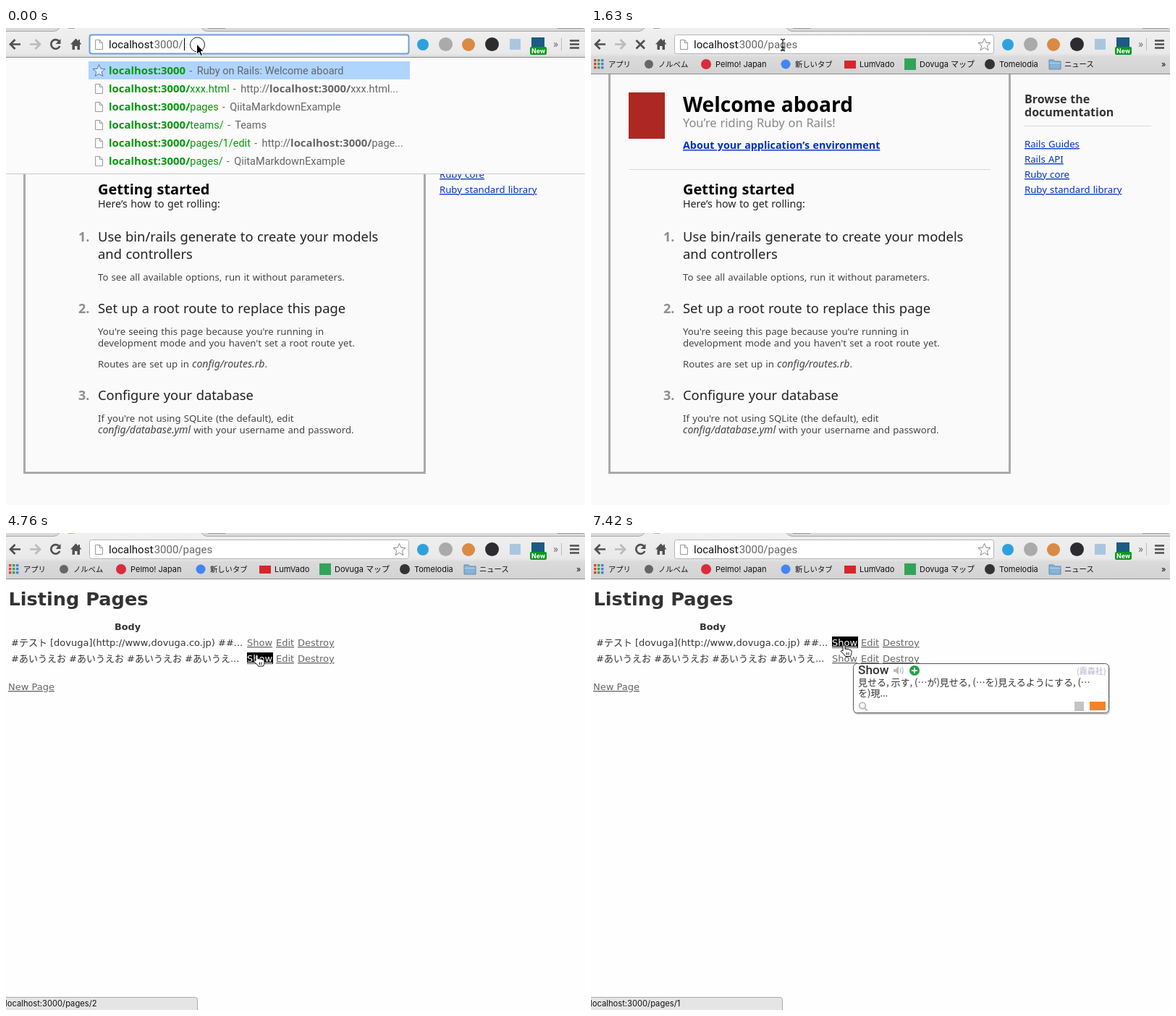
These frames come from a looping animation (800x659 px, 8000 ms). An HTML page:

```html
<!DOCTYPE html>
<html lang="ja">
<head>
<meta charset="utf-8">
<title>Browser session</title>
<style>
html, body { margin: 0; width: 100%; height: 100%; overflow: hidden; background: #fafafa; }
svg { display: block; width: 800px; height: 659px; }
text { white-space: pre; }
.ui { font: 15px Roboto, 'Noto Sans CJK JP', sans-serif; fill: #666; }
.ui .host { fill: #111; }
.row { font: 14.5px Roboto, 'Noto Sans CJK JP', 'Noto Sans CJK', sans-serif; fill: #666; }
.row .b { font: bold 14.9px 'Noto Sans', sans-serif; }
.row .g { fill: #009a0c; }
.row .k { fill: #111; font-size: 14.85px; }
.mark, .status { font: 11px Inter, 'Noto Sans CJK JP', 'Noto Sans CJK', sans-serif; fill: #111; }
.jp { font-size: 10.3px; }
.rails { font: 13.2px 'Noto Sans', sans-serif; word-spacing: .056em; fill: #444; }
.rails .h { font-size: 18.35px; fill: #222; }
.rails .n { font-size: 18px; font-weight: bold; fill: #8d8d92; }
.rails .i { font-size: 14.1px; font-style: italic; }
.rails .bold { font-weight: bold; fill: #333; }
.rails .title { fill: #000; }
.rails .a { fill: #0330c4; text-decoration: underline; }
.list { font: 13px 'DejaVu Sans', 'Noto Sans CJK JP', 'Noto Sans CJK', sans-serif; fill: #333; }
.list .a { fill: #666; text-decoration: underline; }
.list .a.on { fill: #fff; }
.popup { font: 13px 'Noto Sans CJK JP', 'Noto Sans CJK', sans-serif; fill: #333; }
.line { fill: none; stroke: #505050; stroke-width: 2.7; }
</style>
</head>
<body>
<svg viewBox="0 0 800 659">
  <defs>
    <linearGradient id="bar" x2="0" y2="1">
      <stop stop-color="#f0f0f0"/><stop offset=".55" stop-color="#e9e9e9"/>
      <stop offset=".64" stop-color="#dadada"/><stop offset="1" stop-color="#d3d3d3"/>
    </linearGradient>
    <linearGradient id="button" x2="0" y2="1"><stop stop-color="#fff"/><stop offset="1" stop-color="#e0e0e0"/></linearGradient>
    <path id="doc" d="M.5 .5h6l4 4v9h-10zM6.5 .5v4h4" fill="#fff" stroke="#999"/>
    <path id="star" d="M0-8.5 2.4-2.8 8.5-2.4 3.8 1.6 5.3 7.6 0 4.3-5.3 7.6-3.8 1.6-8.5-2.4-2.4-2.8z" fill="#fff" fill-opacity=".5"/>
    <g id="lens" fill="none"><circle r="4.3"/><path d="M3 3 7 7"/></g>
  </defs>

  <rect width="800" height="659" fill="#fafafa"/>
  <g id="rails" class="rails"></g>
  <g id="list" class="list"></g>

  <rect width="800" height="63" fill="url(#bar)"/>
  <path d="M0 63.5H800" stroke="#8a8a8a"/>
  <path d="M0 0H74Q71 4.5 66 4.5H0zM270 0Q273 4.5 278 4.5H800V0z" fill="#d9d9d9"/>
  <path d="M0 4.5H66Q71 4.5 74 0M270 0Q273 4.5 278 4.5H800" fill="none" stroke="#a8a8a8"/>
  <path d="M279 .5H303M762 .5H798" stroke="#999"/>
  <path id="favicon" d="M86 0H95" stroke="#888" stroke-width="1.5"/>

  <path class="line" d="M20 22.5H6M12.5 16 6 22.5 12.5 29"/>
  <path class="line" d="M33 22.5H47M40.5 16 47 22.5 40.5 29" style="stroke:#bbb"/>
  <g id="reload"><path class="line" d="M73.5 18.5A6.3 6.3 0 1 0 74.3 25"/><path d="M75.5 15V22H68.5z" fill="#505050"/></g>
  <path id="stop" class="line" d="M62.5 17 74 28.5M74 17 62.5 28.5"/>
  <path d="M96.5 14.5 89 22.5H91.5V30H95V25H98.5V30H102V22.5H104.5L102 19.8V16H100V17.9z" fill="#505050"/>

  <g id="marks" class="mark"></g>

  <rect id="box" x="115.5" y="9.5" width="441" height="26" rx="3" fill="#fff"/>
  <use href="#doc" x="123" y="16"/>
  <rect id="selection" y="14" height="18" fill="#a9cdfa"/>
  <text class="ui" y="28"><tspan class="host" x="142">localhost</tspan><tspan x="201" id="path"></tspan></text>
  <path id="caret" d="M246.5 14V31" stroke="#000"/>
  <use id="bookmark" href="#star" x="543.5" y="23" stroke="#888"/>

  <g id="tools">
    <circle cx="576" cy="23" r="8" fill="#2ea1dd"/>
    <circle cx="607.5" cy="22.5" r="9.5" fill="#aaa"/>
    <circle cx="639" cy="23" r="9" fill="#d98a45"/>
    <circle cx="671.5" cy="22.5" r="9.5" fill="#2c2c30"/>
    <rect x="696" y="15" width="15" height="15" fill="#a9c6df"/>
    <rect x="726" y="13" width="18" height="14" fill="#1c5b83"/>
    <rect x="724" y="26" width="23" height="11" rx="2" fill="#0a9a1e"/>
    <text x="735.5" y="35" text-anchor="middle" font-family="Roboto, sans-serif" font-size="9.5" font-weight="bold" fill="#fff">New</text>
    <text class="ui" x="756" y="27">»</text>
    <path d="M767.5 14V31" stroke="#bbb"/>
    <path d="M779 17.5H792M779 22.5H792M779 27.5H792" class="line"/>
  </g>

  <g id="drop"></g>

  <g id="popup" class="popup">
    <rect x="363" y="182" width="354" height="69" rx="5" fill="#000" opacity=".18"/>
    <rect x="362.5" y="180.5" width="353" height="68" rx="5" fill="#fff" stroke="#555"/>
    <text x="369" y="195" font-family="Roboto, sans-serif" font-size="17.2" font-weight="500">Show</text>
    <path d="M418 188H421L425 184V196L421 192H418z" fill="#bbb"/>
    <path d="M427 187Q429 190 427 193M429.5 185Q433 190 429.5 195" fill="none" stroke="#bbb" stroke-width="1.3"/>
    <circle cx="447" cy="190" r="7" fill="#1ba53b"/>
    <path d="M443 190H451M447 186V194" stroke="#fff" stroke-width="2"/>
    <text x="712" y="195" text-anchor="end" font-size="11" font-weight="bold" fill="#c9c8d8">(霧森社)</text>
    <text x="369" y="210.5">見せる, 示す, (…が)見せる, (…を)見えるようにする, (…</text>
    <text x="369" y="225.5">を)現...</text>
    <use href="#lens" x="375" y="238.5" stroke="#bbb" stroke-width="2"/>
    <rect x="668" y="233" width="13" height="13" fill="#c4c4c4"/>
    <rect x="689" y="233" width="22" height="12" fill="#f5812a"/>
  </g>

  <g id="status">
    <path d="M-1 641.5H261Q264.5 641.5 264.5 645V660H-1z" fill="#e5e5e5" stroke="#aaa"/>
    <text class="status" id="message" y="654"></text>
  </g>

  <g id="pointer">
    <circle id="ring" r="10" cx="1" cy="1" fill="none" stroke="#222"/>
    <path id="arrow" d="M0 0V14.5L3.3 11.4 5.6 16.5 8 15.4 5.8 10.5H10z" stroke="#fff"/>
    <path id="beam" d="M-3-8Q0-8 0-6V6Q0 8-3 8M3-8Q0-8 0-6M0 6Q0 8 3 8M-2 3H2" fill="none" stroke="#222" stroke-width="1.3"/>
    <path id="hand" d="M0 1.5Q1.5-.8 3 1.5V6Q5 4.8 6 6.3 8 5.3 9 7 11.5 6.2 12 8.5V11Q12 13 10.5 16H3.5Q1.5 12.5-2.8 9.2-2.5 6.8 0 8.5zM5.5 10.5V14M8 10.5V14" fill="#fff" stroke="#111"/>
  </g>
</svg>
<script>
const $ = id => document.getElementById(id);
const text = (x, y, s, cls = '', extra = '') => `<text x="${x}" y="${y}" class="${cls}" ${extra}>${s}</text>`;
const span = (cls, s) => `<tspan class="${cls}">${s}</tspan>`;
const circle = (x, y, r, fill) => `<circle cx="${x}" cy="${y}" r="${r}" fill="${fill}"/>`;
const square = (x, y, w, h, fill) => `<rect x="${x}" y="${y}" width="${w}" height="${h}" fill="${fill}"/>`;
const size = n => `style="font-size:${n}px"`;

$('rails').innerHTML =
  `<path d="M25.5 60V614.5H578.5V60" fill="none" stroke="#aaa" stroke-width="3"/>
   <path d="M52 195.5H552M599 135.5H774" stroke="#d8d8d8"/>` +
  square(52, 89, 50, 64, '#ad2822') +
  text(127, 116, 'Welcome aboard', 'bold title', size(28.1)) +
  text(127, 137, 'You’re riding Ruby on Rails!', '', 'fill="#888" ' + size(16.4)) +
  text(127, 167, 'About your application’s environment', 'bold a', size(14.3)) +
  text(127, 230, 'Getting started', 'bold title', size(20)) +
  text(127, 248, 'Here’s how to get rolling:', '', 'fill="#222" ' + size(14.2)) +
  [295, 394, 514].map((y, i) => text(100, y, i + 1 + '.', 'n')).join('') +
  [[295, 'Use bin/rails generate to create your models'], [319, 'and controllers'],
   [394, 'Set up a root route to replace this page'], [514, 'Configure your database']]
    .map(([y, s]) => text(127, y, s, 'h')).join('') +
  [[349, 'To see all available options, run it without parameters.'],
   [424, "You're seeing this page because you're running in"],
   [440, "development mode and you haven't set a root route yet."],
   [469, `Routes are set up in ${span('i', 'config/routes.rb')}.`],
   [544, "If you're not using SQLite (the default), edit"],
   [560, `${span('i', 'config/database.yml')} with your username and password.`]]
    .map(([y, s]) => text(127, y, s)).join('') +
  text(599, 104, 'Browse the', 'bold', size(16)) + text(599, 122, 'documentation', 'bold', size(16)) +
  ['Rails Guides', 'Rails API', 'Ruby core', 'Ruby standard library']
    .map((s, i) => text(599, 165 + 21 * i, s, 'a')).join('');

const listRow = (y, s, n) =>
  text(7, y, s) + `<rect id="lit${n}" x="333" y="${y - 13}" width="36" height="16" fill="#000"/>` +
  text(333, y, 'Show', 'a', `id="show${n}"`) + text(373, y, 'Edit', 'a') + text(403, y, 'Destroy', 'a');

$('list').innerHTML = square(0, 64, 800, 595, '#fefefe') +
  text(3.5, 100, 'Listing Pages', '', 'font-weight="bold" ' + size(25.6)) +
  text(150, 134, 'Body', '', 'font-weight="bold" ' + size(12.8)) +
  listRow(156, '#テスト [dovuga](http://www,dovuga.co.jp) ##...', 1) +
  listRow(178, '#あいうえお #あいうえお #あいうえお #あいうえ...', 2) +
  text(3, 217, 'New Page', 'a');

const gridColors = ['#d8453b', '#3f9f58', '#4a7fd6', '#e7a92d'];
const grid = Array.from({length: 9}, (_, i) =>
  square(4 + i % 3 * 5, 43 + Math.floor(i / 3) * 5, 3.4, 3.4, gridColors[(i + Math.floor(i / 3)) % 4])).join('');

$('marks').innerHTML = grid +
  '<rect id="hover" x="256.5" y="39.5" width="85" height="21" rx="3" fill="url(#button)" stroke="#aaa"/>' +
  circle(80, 50, 6, '#666') + circle(159, 50, 7, '#d92c3a') + circle(269, 50, 6.5, '#4285f4') +
  square(350, 45, 16, 11, '#d9252a') + square(433, 42, 16, 16, '#34a35a') + circle(551, 50, 7, '#333') +
  '<path d="M633 44H639L641 46H649V57H633z" fill="#86b3d8" stroke="#5f8cb0"/><path d="M633.5 48.5H648.5" stroke="#b8d6ee"/>' +
  [[24, 'アプリ'], [93, 'ノルペム'], [282, '新しいタブ'], [654, 'ニュース']].map(([x, s]) => text(x, 54, s, 'jp')).join('') +
  [[172, 'Pelmo! Japan'], [371, 'LumVado'], [454, 'Dovuga マップ'], [564, 'Tomelodia'], [788, '»']]
    .map(([x, s]) => text(x, 54, s)).join('');

const base = 'localhost:3000/', example = 'QiitaMarkdownExample';
const link = (q, rest) => 'http://' + span('b', base + q) + rest.slice(q.length) + '...';

function suggestions(q) {
  const edit = ['pages/1/edit', link(q, 'page')];
  return q
    ? [['pages', example], ['pages/', example], edit, ['pages/1', example], [null, 'Dovuga 検索']]
    : [['', 'Ruby on Rails: Welcome aboard'], ['xxx.html', link('', 'xxx.html')], ['pages', example],
       ['teams/', 'Teams'], edit, ['pages/', example]];
}

function dropdown(q) {
  const rows = suggestions(q), bottom = 51 + 25 * rows.length;
  return square(0, 41, 800, bottom - 41, '#fbfbfb') +
    `<path d="M0 40.5H800" stroke="#8a8a8a"/><path d="M0 ${bottom + .5}H800" stroke="#ccc"/>` +
    square(114, 46, 444, 25, '#afd4fd') +
    rows.map(([path, about], i) => {
      const y = 64 + 25 * i;
      const icon = path === null ? `<use href="#lens" x="127" y="${y - 7}" stroke="#777" stroke-width="2"/>`
        : path === '' ? `<use href="#star" x="128.5" y="${y - 5}" stroke="#5f7590"/>`
        : `<use href="#doc" x="123" y="${y - 12}"/>`;
      const address = path === null ? span('k', base + q)
        : span('b g', path ? base + q : base.slice(0, -1)) + span('g', path.slice(q.length));
      return icon + text(142, y, address + `<tspan dx="1.5"> -</tspan><tspan dx="3"> ${about}</tspan>`, 'row');
    }).join('');
}

// Each track lists [start ms, value...]; a value holds until the next start.
const at = (track, t) => track.findLast(step => step[0] <= t).slice(1);
const typed = [[0, ''], [300, 'p'], [590, 'pa'], [1180, 'pag'], [1330, 'page'], [1630, null]];
const loading = [[0, false], [1630, true], [2230, false], [5050, true], [6980, false]];
const lit = [[0, 0], [4310, 1], [4610, 2], [7270, 1]];
const messages = [[0, ''], [4310, base + 'pages/1'], [4610, base + 'pages/2'],
  [5640, 'リクエストを処理しています...'], [6980, base + 'pages/2'], [7270, base + 'pages/1']];
const approach = Array.from({length: 8}, (_, i) =>
  [2970 + Math.round(i * 1040 / 7), 'arrow', 265 + 9 * i, 53 + 11.5 * i]);
const pointer = [[0, 'arrow', 263.5, 22], [1630, 'beam', 265, 23.5], [2230, 'arrow', 264, 32],
  [2370, 'arrow', 263, 40], [2520, 'arrow', 262.5, 46], ...approach,
  [4160, 'arrow', 332, 140], [4310, 'hand', 338, 146], [4460, 'hand', 342, 154], [4610, 'hand', 344, 164],
  [4760, 'hand', 345, 168], [5940, 'hand', 347, 170], [6090, 'hand', 349, 172], [6230, 'hand', 350, 173],
  [6980, 'hand', 350, 170], [7130, 'hand', 349, 165], [7270, 'hand', 348, 158], [7420, 'hand', 348, 154.5]];
const typedEnd = [247, 255, 263, 271, 280];

const show = (id, on) => $(id).style.display = on ? '' : 'none';
const between = (t, a, b) => t >= a && t < b;
let drawn;

function render(t) {
  const [q] = at(typed, t), editing = q !== null;
  if (q !== drawn) {
    drawn = q;
    $('drop').innerHTML = editing ? dropdown(q) : '';
    $('path').textContent = q === '' ? ':3000/' : ':3000/pages';
    $('box').setAttribute('stroke', editing ? '#6a9fd9' : '#b4b4b4');
    $('box').setAttribute('stroke-width', editing ? 2 : 1);
    const left = editing ? typedEnd[q.length] : 0;
    $('selection').setAttribute('x', left);
    $('selection').setAttribute('width', q ? 286 - left : 0);
  }
  show('caret', q === '');
  show('bookmark', !editing);
  show('rails', t < 2080);
  show('list', t >= 2080);

  const [busy] = at(loading, t);
  show('reload', !busy);
  show('stop', busy);
  $('favicon').setAttribute('stroke', t < 2080 ? '#888' : '#c9a24a');

  const [row] = at(lit, t);
  for (const n of [1, 2]) {
    show('lit' + n, row === n);
    $('show' + n).classList.toggle('on', row === n);
  }
  const [message] = at(messages, t), waiting = message.startsWith('リ');
  show('status', message);
  $('message').textContent = message;
  $('message').setAttribute('x', waiting ? 0 : -1);
  $('message').style.fontSize = waiting ? '10px' : '11.2px';

  show('popup', t >= 5340);
  show('hover', between(t, 2370, 3120));
  const [shape, x, y] = at(pointer, t);
  for (const id of ['arrow', 'beam', 'hand']) show(id, id === shape);
  show('ring', t < 150 || between(t, 4900, 5050));
  $('pointer').setAttribute('transform', `translate(${x} ${y})`);
}

const start = performance.now();
function tick() {
  render((performance.now() - start) % 8000);
  requestAnimationFrame(tick);
}
tick();
</script>
</body>
</html>
```
